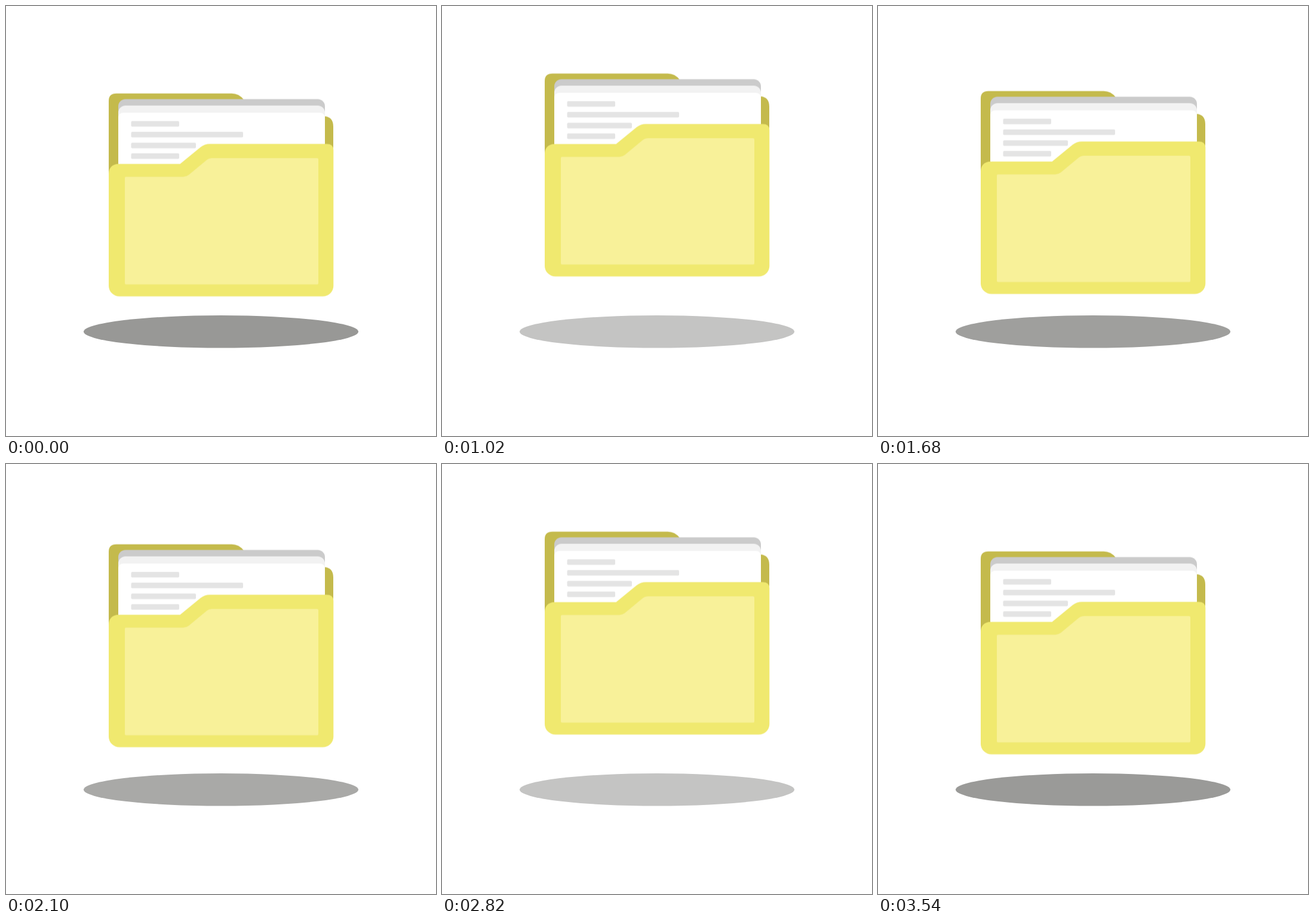
These frames come from a looping animation (720x720 px, 3.57 s). An HTML page:

```html
<!DOCTYPE html>
<html lang="en">
<head>
<meta charset="utf-8">
<title>Floating folder</title>
<style>
  html, body { margin: 0; width: 100%; height: 100%; overflow: hidden; background: #fff; }
  svg { display: block; width: 100vw; height: 100vh; }
</style>
</head>
<body>
<svg viewBox="0 0 720 720">
  <ellipse id="shadow" cx="360" cy="545.3" rx="230" ry="27.2" fill="#989896"/>
  <g id="folder">
    <path fill="#c4ba4c" d="M172 300V160Q172 147.7 185 147.7H378Q390 147.7 398 158L420 186H534Q548 187.500 548 203V300Z"/>
    <g id="papers">
      <rect x="188" y="157.300" width="346" height="120" rx="12" fill="#cbcbcb"/>
      <rect x="188" y="168" width="346" height="110" rx="12" fill="#f2f2f2"/>
      <rect x="188" y="180" width="346" height="100" rx="8" fill="#fff"/>
    </g>
    <g fill="#e4e4e4">
      <rect x="209.500" y="194" width="80.500" height="9.300" rx="2"/>
      <rect x="209.500" y="212" width="187.500" height="9.300" rx="2"/>
      <rect x="209.500" y="230.300" width="108.500" height="9.300" rx="2"/>
      <rect x="209.500" y="248" width="80.500" height="9.300" rx="2"/>
    </g>
    <path fill="#f0e96f" d="M172 282C172 272 179 265.800 188 265.800H291.500L326 237.500Q333 232.200 341 232.200H537Q548 232.200 548.300 242V470A18 17.500 0 0 1 530 487.500H190A18 17.500 0 0 1 172 470Z"/>
    <path fill="#f8f199" d="M199 289Q199 287.200 201 287.200H297Q302 287.200 306 284L335 260Q339.500 256 345 256H521Q523 256 523 258V465.500Q523 467.500 521 467.500H201Q199 467.500 199 465.500Z"/>
  </g>
</svg>
<script>
  const LOOP = 3570, STEP = 30;
  const turns = [0, 900, 1800, 2700, LOOP];

  // Swing between two poses, with the picture updated once per STEP.
  function swing(id, prop, low, high) {
    const frames = turns.map((t, i) => ({
      offset: t / LOOP,
      [prop]: i % 2 ? high : low,
      easing: i < turns.length - 1 ? `steps(${(turns[i + 1] - t) / STEP}, end)` : 'linear'
    }));
    const anim = document.getElementById(id).animate(frames, { duration: LOOP, iterations: Infinity });
    anim.startTime = 0;
  }

  swing('folder', 'transform', 'translateY(0px)', 'translateY(-40px)');
  swing('shadow', 'fill', '#989896', '#cbcbca');
</script>
</body>
</html>
```
